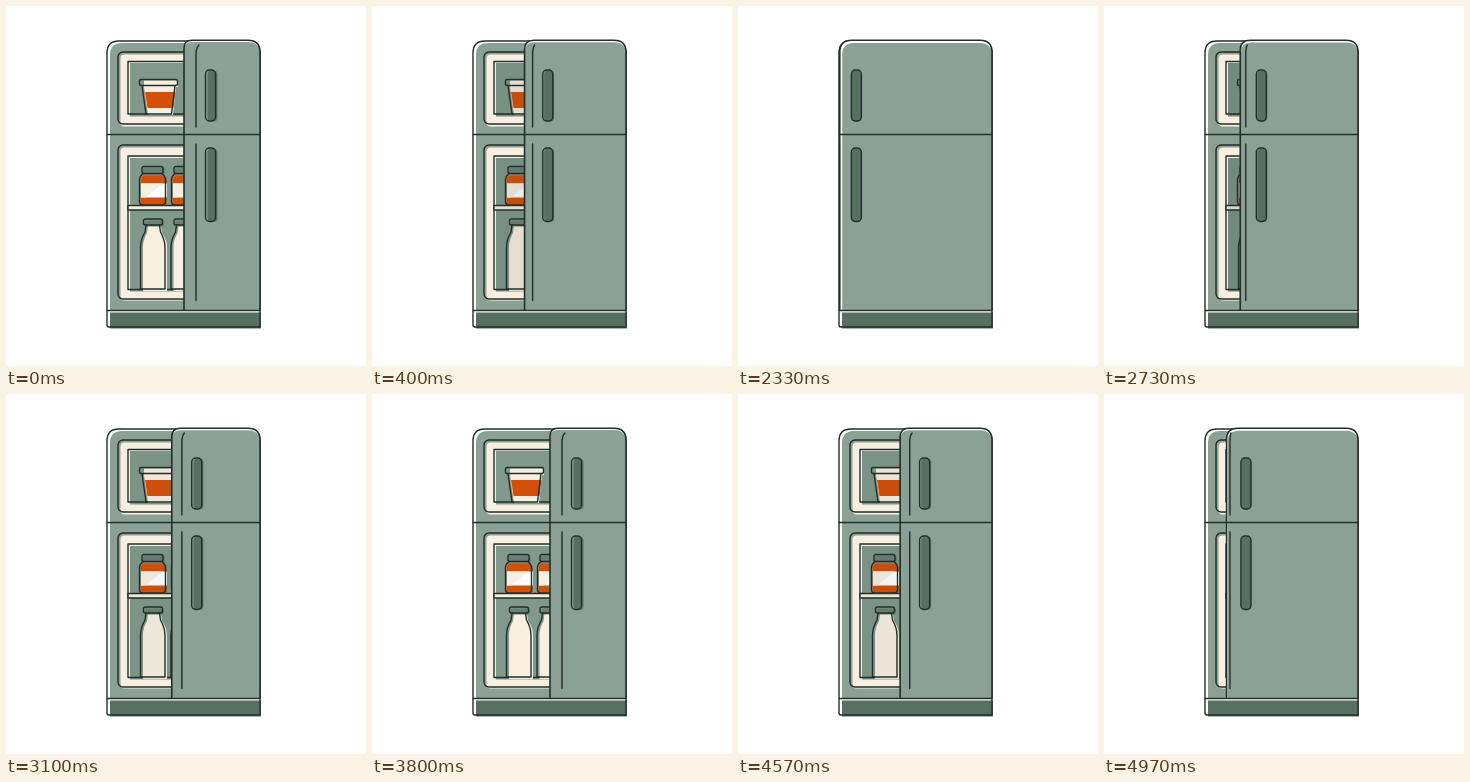
Recreate the animation shown at these times as an HTML page. Size 360 px wide and 360 px high, loop 5000 ms.

```html
<!DOCTYPE html>
<html lang="en">
<head>
<meta charset="utf-8">
<title>Fridge</title>
<style>
html, body { margin: 0; width: 100%; height: 100%; overflow: hidden; background: #fff; }
svg { display: block; width: 100vw; height: 100vh; }
.ink { fill: none; stroke: #222e29; stroke-width: 1.4; stroke-linecap: round; stroke-linejoin: round; }
.body { fill: #8ba196; }
.dark { fill: #587062; }
.lid { fill: #688174; }
.back { fill: #80998c; }
.cream { fill: #f9efe1; }
.orange { fill: #d4500a; }
.white { fill: #fff; }
.shade { fill: #24362d; }
</style>
</head>
<body>
<svg viewBox="0 0 360 360">
  <defs>
    <g id="jar">
      <path class="orange" d="M3 9H24Q27 11 27 14V36Q27 39 24 39H4Q1 39 1 36V14Q1 11 3 9Z"/>
      <path class="white" d="M1 17H27V31H1Z"/>
      <path class="cream" d="M1 17H23L5 31H1Z"/>
      <rect class="lid" x="3" y="1" width="22" height="7" rx="2"/>
      <rect class="ink" x="2" y="0" width="21" height="7" rx="2"/>
      <path class="ink" d="M3 7Q-.5 10 -.5 13V35Q-.5 38.500 3 38.500H22Q25.500 38.500 25.500 35V13Q25.500 10 22 7"/>
    </g>
    <g id="bottle">
      <path class="cream" d="M7 7H20L21 14Q26 21 26 28V72H2V28Q2 21 6 14Z"/>
      <rect class="lid" x="4" y="1.500" width="19" height="6" rx="2"/>
      <rect class="ink" x="2.500" y="0" width="19" height="6" rx="2"/>
      <path class="ink" d="M5 6L4 13Q-.5 21 -.5 28V70H24V28Q24 21 19.500 13L18.500 6"/>
    </g>
  </defs>

  <path class="body" d="M104 304V49Q104 37 116 37H242Q254 37 254 49V304Z"/>
  <path class="ink" d="M101 304V47Q101 35 113 35H242Q254 35 254 47V304"/>
  <path class="ink" d="M101 128.500H254"/>

  <rect class="cream" x="114.500" y="48.500" width="90" height="72" rx="4"/>
  <rect class="back" x="124" y="57" width="80" height="53.500"/>
  <rect class="ink" x="112" y="46" width="90" height="72" rx="5"/>
  <path class="ink" d="M200 55.500H122V108H200"/>
  <path class="cream" d="M138 74.500H172V81H170L167 109H142L138 81Z"/>
  <path class="orange" d="M139 86H169.500L167.500 102H141.500Z"/>
  <path class="ink" d="M136 79.500L140 108H165.500L169 79.500"/>
  <rect class="ink" x="133.500" y="73.500" width="38" height="6" rx="1.500"/>

  <rect class="cream" x="114.500" y="141.500" width="90" height="153" rx="4"/>
  <rect class="back" x="124" y="152" width="80" height="133.500"/>
  <rect class="ink" x="112" y="139" width="90" height="154" rx="5"/>
  <path class="ink" d="M200 150H122V283.500H200"/>
  <rect class="cream" x="122" y="200" width="80" height="4"/>
  <rect class="ink" x="122" y="199.500" width="80" height="4.500"/>
  <use href="#jar" x="134" y="160.500"/>
  <use href="#jar" x="166" y="160.500"/>
  <use href="#bottle" x="135" y="213"/>
  <use href="#bottle" x="165.500" y="213"/>
  <path id="shade" class="shade" d="M124 57H200V110.500H124ZM124 152H200V285.500H124Z"/>

  <path id="gap" class="white"/>
  <path id="panel" class="body"/>
  <path id="edge" class="ink" style="stroke-width:1.600"/>
  <path id="seam" class="ink"/>
  <g id="handles"></g>

  <rect class="dark" x="104" y="306.500" width="151" height="16"/>
  <path class="ink" d="M101 304.500H254V321H103Q101 321 101 319Z"/>
</svg>
<script>
const LOOP = 5000;
const el = id => document.getElementById(id);
const set = (node, attrs) => {
  for (const k in attrs) node.setAttribute(k, attrs[k]);
};

const handles = [[64, 51], [142, 73.5]].map(([y, height]) => {
  const make = (cls, dy) => {
    const r = document.createElementNS("http://www.w3.org/2000/svg", "rect");
    set(r, { class: cls, y: y + dy, height, width: 10, rx: 4 });
    el("handles").appendChild(r);
    return r;
  };
  return { fill: make("dark", 0.5), line: make("ink", 0) };
});

// Bezier (.3, 0, .3, 1), solved for x by bisection
function ease(x) {
  if (x <= 0) return 0;
  if (x >= 1) return 1;
  let lo = 0, hi = 1, s;
  for (let i = 0; i < 24; i++) {
    s = (lo + hi) / 2;
    if (0.9 * s * (1 - s) + s * s * s < x) lo = s; else hi = s;
  }
  return s * s * (3 - 2 * s);
}

// 0 is fully open, 1 is shut
function closedAt(t) {
  if (t < 2260) return ease(t / 1485);
  if (t < 4000) return 1 - ease((t - 2260) / 1430);
  return ease((t - 4258) / 1485);
}

function draw(t) {
  const p = closedAt(t), open = 1 - p;
  const x = 101 + 77 * open;
  const r = 8 + 4 * p;
  const shape = (l, top) =>
    `M${l} 304V${top + r}Q${l} ${top} ${l + r} ${top}H242Q254 ${top} 254 ${top + 12}V304`;

  const outline = shape(x, 34.3);
  set(el("gap"), { d: outline + "Z" });
  set(el("panel"), { d: shape(x + 2.5 * p * p, 36 + p) + "Z" });
  set(el("edge"), { d: outline + `M${x} 128.5H254` });
  set(el("shade"), { opacity: 0.28 * p });

  const i = x + 12 * open;
  set(el("seam"), {
    d: `M${i + 3 * open} 39Q${i} 42 ${i} 48V121M${i} 138V294.5`,
    opacity: Math.min(1, open * 15)
  });

  const hx = 112.5 + 87 * open;
  for (const h of handles) {
    set(h.fill, { x: hx + 2 * open, fill: "#587062" });
    set(h.line, { x: hx });
  }
}

const start = performance.now();
function tick() {
  draw((performance.now() - start) % LOOP);
  requestAnimationFrame(tick);
}
tick();
</script>
</body>
</html>
```
